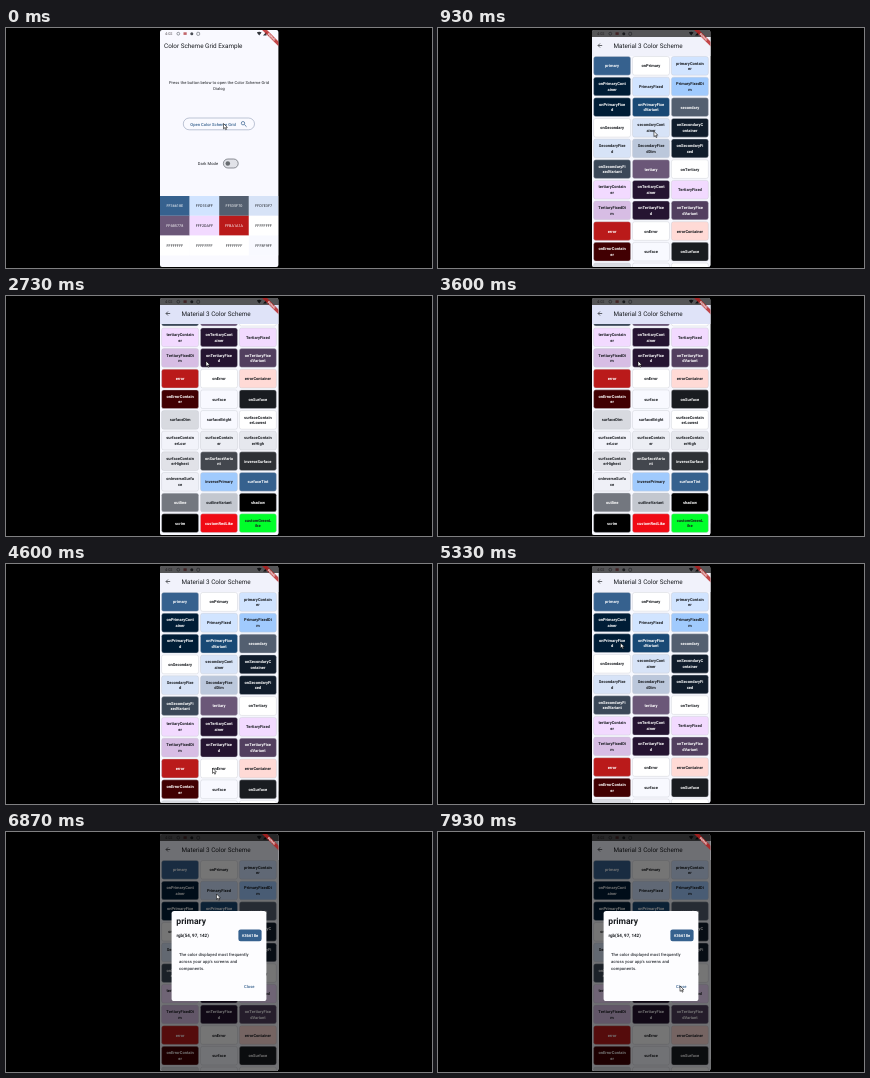
Recreate the animation shown at these times as an HTML page. Size 426 px wide and 240 px high, loop 8000 ms.

```html
<!DOCTYPE html>
<html lang="en">
<head>
<meta charset="utf-8">
<title>Color scheme grid</title>
<style>
html, body { margin: 0; width: 100%; height: 100%; overflow: hidden; background: #000; }
svg { display: block; width: 100vw; height: 100vh; }
text { font-family: Roboto, sans-serif; text-rendering: geometricPrecision; white-space: pre; }
</style>
</head>
<body>
<svg id="stage" viewBox="0 0 426 240">
  <defs>
    <clipPath id="screen"><rect x="154" y="2" width="118.4" height="237" rx="2"/></clipPath>
    <clipPath id="list"><rect x="154" y="28" width="118.4" height="211"/></clipPath>
  </defs>
  <rect width="426" height="240" fill="#000"/>
  <g clip-path="url(#screen)">
    <rect x="154" y="2" width="119" height="237" fill="#f9f9ff"/>
    <g id="home"></g>
    <rect id="pageShade" x="154" y="2" width="119" height="237" fill="#000"/>
    <g id="page">
      <rect x="154" y="9" width="119" height="230" fill="#f8f9ff"/>
      <g clip-path="url(#list)"><g id="cells"></g></g>
      <rect id="bar" x="154" y="9" width="119" height="19"/>
      <path d="M164.2 17.5H160.2M162 15.5L160 17.5L162 19.5" fill="none" stroke="#191c20" stroke-width=".65"/>
    </g>
    <rect id="boxShade" x="154" y="2" width="119" height="237" fill="#000"/>
    <g id="box"></g>
    <g transform="translate(272.4 2) rotate(45)">
      <rect x="-12" y="8" width="24" height="3.5" fill="#b71c1c" opacity=".8"/>
      <text x="0" y="10.8" font-size="2.9" font-weight="900" text-anchor="middle" fill="#fff">DEBUG</text>
    </g>
  </g>
  <path id="cursor" d="M0 0V5.4L1.3 4.2L2.2 6.2L3.1 5.8L2.2 3.9H3.9Z" fill="#fff" stroke="#000" stroke-width=".55"/>
</svg>
<script>
const LOOP = 8000;
const $ = id => document.getElementById(id);
const INK = '#191c20';

function add(parent, tag, attrs, content) {
  const el = document.createElementNS('http://www.w3.org/2000/svg', tag);
  for (const k in attrs) el.setAttribute(k, attrs[k]);
  if (content) el.textContent = content;
  parent.appendChild(el);
  return el;
}
function label(parent, str, x, y, size = 4.02, more = {}) {
  return add(parent, 'text', { x, y, 'font-size': size, fill: INK, ...more }, str);
}
const mid = { 'text-anchor': 'middle' };

function isDark(hex) {
  const n = parseInt(hex, 16);
  return 0.3 * (n >> 16) + 0.59 * (n >> 8 & 255) + 0.11 * (n & 255) < 140;
}

function buildHome() {
  const g = $('home');
  label(g, '4:02', 159, 7.2, 3.9, { fill: '#5a5358' });
  add(g, 'circle', { cx: 172.3, cy: 5.7, r: 1.4, fill: 'none', stroke: '#555a62', 'stroke-width': .6 });
  add(g, 'rect', { x: 177.5, y: 4.3, width: 3.2, height: 2.6, fill: '#c2666b' });
  add(g, 'circle', { cx: 185.8, cy: 5.7, r: 1.5, fill: '#4a4d55' });
  add(g, 'rect', { x: 190.8, y: 4.3, width: 2.8, height: 3, rx: .8, fill: 'none', stroke: '#555a62', 'stroke-width': .6 });
  add(g, 'path', { d: 'M250.8 4.5Q253.2 2.8 255.6 4.5L253.2 7.5ZM260.5 3.8V7.5H257Z', fill: '#33363c' });

  label(g, 'Color Scheme Grid Example', 158, 19.8, 6.35);
  const body = { ...mid, 'letter-spacing': .07 };
  label(g, 'Press the button below to open the Color Scheme Grid', 213, 56, 4.02, body);
  label(g, 'Dialog', 213, 61.8, 4.02, body);

  add(g, 'rect', { x: 177.3, y: 90, width: 71.2, height: 11.8, rx: 5.9, fill: '#fafaff', stroke: '#7f8ca8', 'stroke-width': .5 });
  label(g, 'Open Color Scheme Grid', 184.3, 97.5, 4.1, { fill: '#36618e', 'font-weight': 500, 'letter-spacing': .03 });
  add(g, 'path', { d: 'M238.4 96.6L240.5 98.7', stroke: '#36618e', 'stroke-width': .8 });
  add(g, 'circle', { cx: 237, cy: 95.2, r: 1.7, fill: 'none', stroke: '#36618e', 'stroke-width': .7 });

  label(g, 'Dark Mode', 191.8, 137, 4.1, { 'letter-spacing': .07 });
  add(g, 'rect', { x: 217.4, y: 131, width: 14.8, height: 9, rx: 4.5, fill: '#e1e2e8', stroke: '#5f636b', 'stroke-width': .7 });
  add(g, 'circle', { cx: 221.8, cy: 135.5, r: 2.3, fill: '#686c70' });

  ['36618E D1E4FF 535F70 D7E3F7', '6B5778 F2DAFF BA1A1A FFFFFF', 'FFFFFF FFFFFF FFFFFF F8F9FF'].forEach((row, r) =>
    row.split(' ').forEach((hex, c) => {
      const x = 154 + c * 29.6, y = 168 + r * 19.8;
      add(g, 'rect', { x, y, width: 29.7, height: 19.8, fill: '#' + hex });
      label(g, 'FF' + hex, x + 14.8, y + 11.2, 3.75, { ...mid, fill: isDark(hex) ? '#fff' : INK });
    }));
}

// One line per grid row; "/" marks where a name wraps.
const ROWS = `
primary 36618E, onPrimary FFFFFF, primaryContain/er D1E4FF
onPrimaryCont/ainer 001D36, PrimaryFixed D1E4FF, PrimaryFixedDi/m A0CAFD
onPrimaryFixe/d 001D36, onPrimaryFixe/dVariant 194975, secondary 535F70
onSecondary FFFFFF, secondaryCont/ainer D7E3F7, onSecondaryC/ontainer 101C2B
SecondaryFixe/d D7E3F7, SecondaryFixe/dDim BBC7DB, onSecondaryFi/xed 101C2B
onSecondaryFi/xedVariant 3B4858, tertiary 6B5778, onTertiary FFFFFF
tertiaryContain/er F2DAFF, onTertiaryCont/ainer 251431, TertiaryFixed F2DAFF
TertiaryFixedDi/m D7BDE4, onTertiaryFixe/d 251431, onTertiaryFixe/dVariant 523F5F
error BA1A1A, onError FFFFFF, errorContainer FFDAD6
onErrorContain/er 410002, surface F8F9FF, onSurface 191C20
surfaceDim D8DAE0, surfaceBright F8F9FF, surfaceContain/erLowest FFFFFF
surfaceContain/erLow F2F3FA, surfaceContain/er ECEEF4, surfaceContain/erHigh E6E8EE
surfaceContain/erHighest E1E2E8, onSurfaceVaria/nt 43474E, inverseSurface 2E3135
onInverseSurfa/ce EFF0F7, inversePrimary A0CAFD, surfaceTint 36618E
outline 73777F, outlineVariant C3C7CF, shadow 000000
scrim 000000, customRedLike F00A14, customGreenL/ike 00FF2A`;

function buildPage() {
  const g = $('cells');
  ROWS.trim().split('\n').forEach((row, r) =>
    row.split(', ').forEach((cell, c) => {
      const [name, hex] = cell.split(' ');
      const x = 155.6 + c * 38.9, y = 28.5 + r * 20.65;
      add(g, 'rect', { x, y, width: 37, height: 18.7, rx: 2.2, fill: '#' + hex, stroke: '#c6c8d0', 'stroke-width': .4 });
      const lines = name.split('/');
      const fill = isDark(hex) || name === 'customRedLike' ? '#fff' : INK;
      lines.forEach((line, i) =>
        label(g, line, x + 18.5, y + 10.8 + (i - (lines.length - 1) / 2) * 5.6, 4.02, { ...mid, fill, 'font-weight': 700 }));
    }));
  label($('page'), 'Material 3 Color Scheme', 175.4, 19.8, 6.35);
}

function buildBox() {
  const g = $('box');
  add(g, 'rect', { x: 165.6, y: 79, width: 94.8, height: 90, rx: 2.6, fill: '#fdfdff' });
  label(g, 'primary', 170.3, 92.4, 8.6, { 'font-weight': 700 });
  label(g, 'rgb(54, 97, 142)', 170.4, 105, 4.5, { 'font-weight': 700 });
  add(g, 'rect', { x: 232.4, y: 97.4, width: 23.2, height: 11.8, rx: 2.2, fill: '#36618e' });
  label(g, '#36618e', 244, 104.8, 4.1, { ...mid, fill: '#fff', 'font-weight': 700 });
  ['The color displayed most frequently', 'across your app\'s screens and', 'components.'].forEach((s, i) =>
    label(g, s, 173, 124.2 + i * 6.9, 4.2, { fill: '#2e3238', 'font-weight': 500, 'letter-spacing': .07 }));
  label(g, 'Close', 243.3, 156, 4.1, { ...mid, fill: '#36618e', 'font-weight': 500 });
}

// Keys are [time, ...values]; each span is eased.
const smooth = p => p * p * (3 - 2 * p);
const linear = p => p;
const decel = p => 1 - (1 - p) ** 3;
function track(keys, t, ease = smooth) {
  let i = 0;
  while (i < keys.length - 2 && t >= keys[i + 1][0]) i++;
  const [a, b] = [keys[i], keys[i + 1]];
  const p = ease(Math.min(1, Math.max(0, (t - a[0]) / (b[0] - a[0]))));
  return a.slice(1).map((v, k) => v + (b[k + 1] - v) * p);
}
const ramp = (t, from, length) => Math.min(1, Math.max(0, (t - from) / length));

const PRESS = 1735, RELEASE = 2150, PRESS_Y = 142.5, END = 120.5;
const POINTER = [[0, 217.5, 95.5], [750, 217.5, 95.5], [1450, 208, PRESS_Y], [PRESS, 208, PRESS_Y],
  [2230, 204, 65], [2700, 200, 65], [3650, 200, 65], [4550, 206.5, 204], [4750, 206.5, 204],
  [5600, 175, 40], [6200, 175, 40], [6870, 210.5, 62], [7650, 242, 154], [8000, 242, 154]];
const pointerY = t => track(POINTER, t)[1];

// Drag up, fling to the end, then drag back to the top.
function scrollAt(t) {
  if (t < PRESS) return 0;
  if (t < RELEASE) return PRESS_Y - pointerY(t);
  if (t < 3650) return track([[RELEASE, PRESS_Y - pointerY(RELEASE)], [2800, END]], t, decel)[0];
  return Math.max(0, END + 65 - pointerY(Math.min(t, 4550)));
}

function draw(t) {
  const open = ramp(t, 700, 150), box = ramp(t, 5950, 200);
  const scroll = scrollAt(t);
  const stretch = 1 + .008 * track([[4400, 0], [4560, 1], [4640, 1], [4850, 0]], t, linear)[0];
  const [x, y] = track(POINTER, t);

  $('pageShade').setAttribute('opacity', .66 * open);
  $('page').setAttribute('opacity', open);
  $('bar').setAttribute('fill', scroll > .5 ? '#dfe3f8' : '#f1f2fb');
  $('cells').setAttribute('transform', `translate(0 ${28 - scroll}) scale(1 ${stretch}) translate(0 -28)`);
  $('boxShade').setAttribute('opacity', .54 * box);
  $('box').setAttribute('opacity', box);
  $('cursor').setAttribute('transform', `translate(${x} ${y})`);
}

buildHome();
buildPage();
buildBox();
const start = performance.now();
function tick() {
  draw((performance.now() - start) % LOOP);
  requestAnimationFrame(tick);
}
tick();
</script>
</body>
</html>
```
